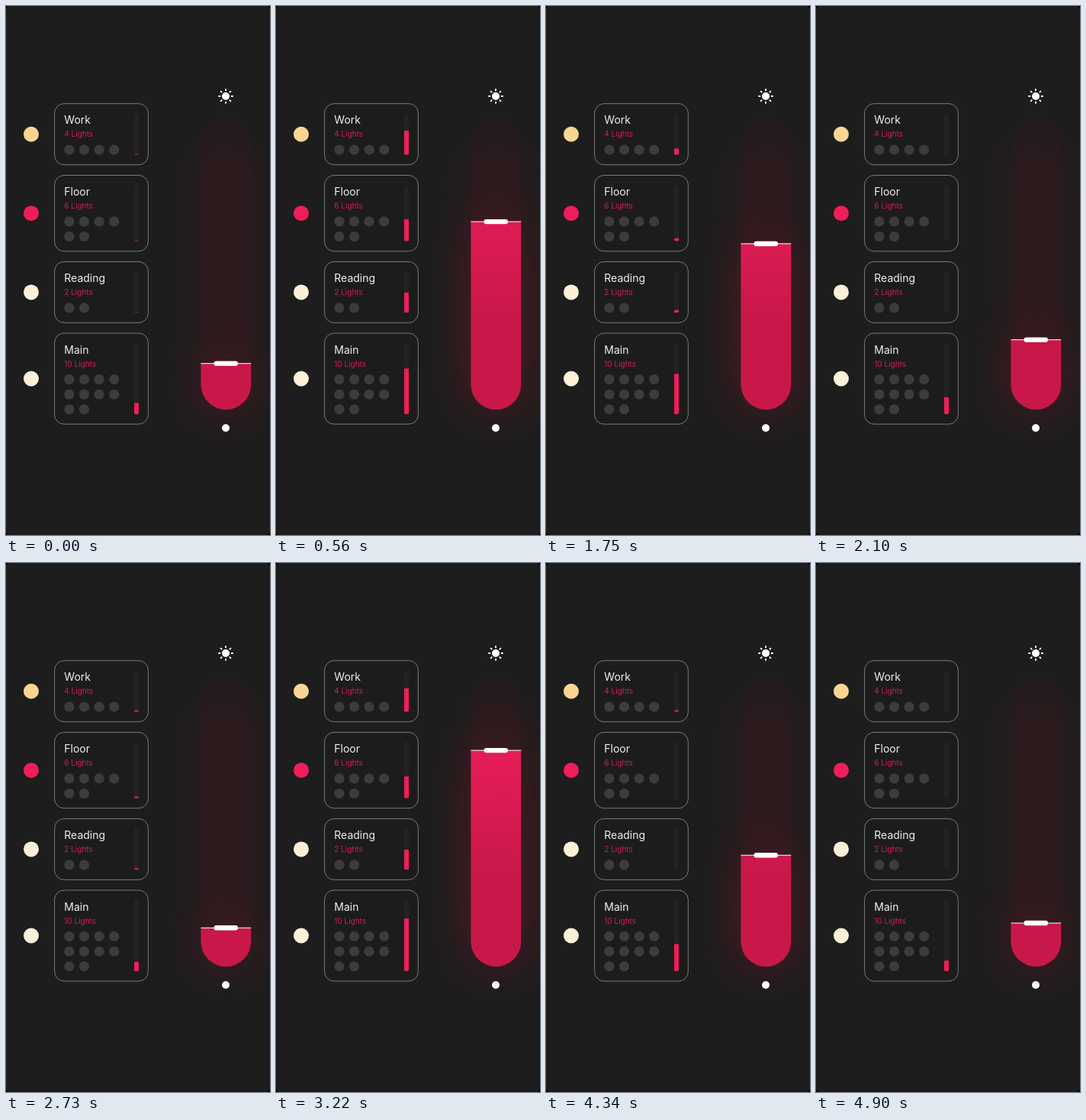
Recreate the animation shown at these times as an HTML page. Size 346 px wide and 692 px high, loop 5.11 s.

```html
<!DOCTYPE html>
<html lang="en">
<head>
<meta charset="utf-8">
<title>Light dimmer</title>
<style>
  html, body { margin: 0; width: 100%; height: 100%; overflow: hidden; background: #000; }
  svg { display: block; width: 100vw; height: 100vh; }
  text { font-family: Inter, "Open Sans", sans-serif; }
  .title { font-size: 14px; fill: #f0f0f0; }
  .count { font-size: 10px; fill: #d41b52; }
</style>
</head>
<body>
<svg id="stage" viewBox="0 0 346 692">
  <defs>
    <clipPath id="pill"><rect x="255.4" y="146" width="65.8" height="382" rx="32.9"/></clipPath>
    <linearGradient id="heat" gradientUnits="userSpaceOnUse" x1="0" y1="200" x2="0" y2="410">
      <stop offset="0" stop-color="#ef1e5c"/>
      <stop offset="1" stop-color="#c8184a"/>
    </linearGradient>
    <filter id="wide" filterUnits="userSpaceOnUse" x="130" y="20" width="320" height="660" color-interpolation-filters="sRGB">
      <feGaussianBlur stdDeviation="34"/>
    </filter>
    <filter id="soft" filterUnits="userSpaceOnUse" x="130" y="20" width="320" height="660" color-interpolation-filters="sRGB">
      <feGaussianBlur stdDeviation="20"/>
    </filter>
  </defs>
  <rect width="346" height="692" rx="5" fill="#1d1d1d"/>
  <g fill="#e81436">
    <rect x="243" y="178" width="90" height="352" rx="44" opacity=".055" filter="url(#soft)"/>
    <g opacity=".2" filter="url(#wide)"><rect id="glow" x="255.5" width="65.5" rx="26"/></g>
    <rect x="255.5" y="146" width="65.5" height="382" rx="32.75" opacity=".025"/>
  </g>
  <g clip-path="url(#pill)">
    <rect id="fill" x="255" width="67" fill="url(#heat)"/>
    <rect id="line" x="255" width="67" height="1" fill="#fff"/>
  </g>
  <rect id="handle" x="272.5" width="31.5" height="6.4" rx="3" fill="#fff"/>
  <g id="sun" stroke="#fff" stroke-width="1.9" stroke-linecap="round">
    <circle cx="288" cy="118" r="5" fill="#fff" stroke="none"/>
  </g>
  <circle cx="288" cy="552" r="5" fill="#fff"/>
  <g id="cards"></g>
</svg>
<script>
const LOOP = 5110, STEP = 70;
const TOP = 146, BOTTOM = 528, PAD = 13;
const $ = id => document.getElementById(id);

function set(el, attrs) {
  for (const key in attrs) el.setAttribute(key, attrs[key]);
}

function add(parent, tag, attrs, text) {
  const el = document.createElementNS('http://www.w3.org/2000/svg', tag);
  set(el, attrs);
  if (text) el.textContent = text;
  return parent.appendChild(el);
}

// Soft start, long settling end
function ease(u) {
  u = Math.min(1, Math.max(0, u));
  return 1 - (1 - u ** 1.6) ** 2.9;
}

// Each drag of the handle, up and down in turn
const drags = [
  { start: -40, end: 1225, from: 471, to: 180 },
  { start: 1330, end: 2590, from: 180, to: 490 },
  { start: 2660, end: 3690, from: 490, to: 162 },
  { start: 3780, end: 4860, from: 162, to: 471 }
];
const currentDrag = t => drags.findLast(d => d.start <= t);

function handleY(t) {
  const { start, end, from, to } = currentDrag(t);
  return from + (to - from) * ease((t - start) / (end - start));
}

// Side bars go fully on with a drag up and off with a drag down
function follow(peak, duration) {
  return t => {
    const { start, from, to } = currentDrag(t);
    const done = ease((t - start) / duration);
    return peak * (to < from ? done : 1 - done);
  };
}

const rooms = [
  { name: 'Work', lights: 4, y: 127.7, h: 80, color: '#fbd592', level: follow(.61, 770) },
  { name: 'Floor', lights: 6, y: 221.5, h: 99.3, color: '#ef1e5a', level: follow(.395, 650) },
  { name: 'Reading', lights: 2, y: 334.5, h: 79.8, color: '#fcf1d8', level: follow(.495, 650) },
  { name: 'Main', lights: 10, y: 428, h: 119, color: '#fcf1d8', level: t => (BOTTOM - handleY(t)) / (BOTTOM - TOP) }
];

function buildCard(room, index) {
  const { y, h } = room, g = $('cards');
  add(g, 'circle', { cx: 33, cy: y + h / 2, r: 10, fill: room.color });
  add(g, 'rect', { x: 63.6, y, width: 122.7, height: h, rx: 12.5, fill: '#1c1c1c', stroke: '#858585', 'stroke-width': .9 });
  add(g, 'text', { x: 76.3, y: y + 26.6, class: 'title' }, room.name);
  add(g, 'text', { x: 76.3, y: y + 43.6, class: 'count' }, room.lights + ' Lights');
  for (let i = 0; i < room.lights; i++) {
    add(g, 'circle', { cx: 82.9 + i % 4 * 19.6, cy: y + 60.4 + Math.floor(i / 4) * 19.6, r: 6.6, fill: '#3c3c3c' });
  }
  const bar = { x: 167.8, y: y + PAD, width: 6.3, height: h - 2 * PAD, rx: 2 };
  add(g, 'rect', { ...bar, fill: '#232323' });
  const clip = add(g, 'clipPath', { id: 'bar' + index });
  add(clip, 'rect', bar);
  room.bar = add(g, 'rect', { x: bar.x, width: bar.width, rx: 1, fill: '#ee1e5a', 'clip-path': `url(#bar${index})` });
}

for (let i = 0; i < 8; i++) {
  add($('sun'), 'line', { x1: 295.6, x2: 297, y1: 118, y2: 118, transform: `rotate(${i * 45} 288 118)` });
}
rooms.forEach(buildCard);

function render(t) {
  const y = handleY(t);
  set($('fill'), { y, height: BOTTOM - y });
  set($('glow'), { y, height: BOTTOM - y });
  set($('line'), { y: y - .5 });
  set($('handle'), { y: y - 3.2 });
  for (const room of rooms) {
    const height = room.level(t) * (room.h - 2 * PAD);
    set(room.bar, { y: room.y + room.h - PAD - height, height });
  }
}

const start = performance.now();
function tick() {
  const t = (performance.now() - start) % LOOP;
  render(Math.floor(t / STEP) * STEP);
  requestAnimationFrame(tick);
}
tick();
</script>
</body>
</html>
```
